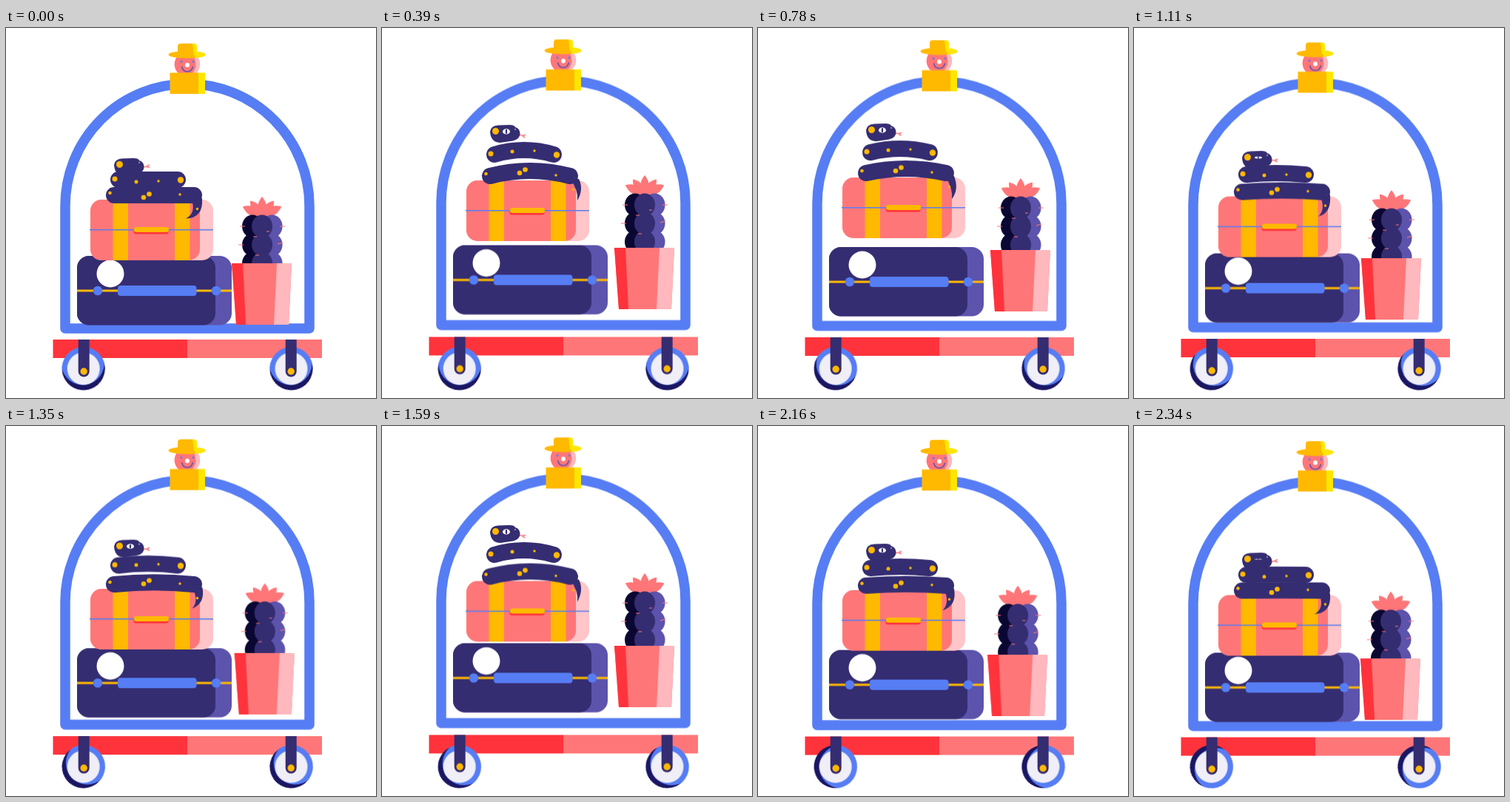
Write an HTML page without scripts that moves like this. It is 500x500 px and loops after 2.37 s.

```html
<!DOCTYPE html>
<html lang="en">
<head>
<meta charset="utf-8">
<title>Luggage trolley</title>
<style>
html, body { margin: 0; width: 100%; height: 100%; overflow: hidden; background: #fff; }
svg { display: block; width: 100vw; height: 100vh; }

/* Heights of each part: up, over and near landing, for two bounces */
.hop { animation: hop 2.37s infinite; }
.deck  { --a: -3.5px; --b: -3px; --c: -1px; --d: -3.5px; --e: -2.5px; --f: -.4px; }
.frame { --a: -4.5px; --b: -3.5px; --c: -1.5px; --d: -4.5px; --e: -3px; --f: -.5px; }
.porter { --a: -5.5px; --b: -4.5px; --c: -1.5px; --d: -5.5px; --e: -4px; --f: -.5px; }
.trunk { --a: -14.5px; --b: -12px; --c: -3.5px; --d: -14.5px; --e: -9px; --f: -1.7px; }
.bag   { --a: -26px; --b: -30px; --c: -4.5px; --d: -22.5px; --e: -17px; --f: -3.7px; }
.coil  { --a: -34px; --b: -37px; --c: -7px; --d: -31px; --e: -22px; --f: -4px; }
.head  { --a: -45px; --b: -47px; --c: -10px; --d: -42px; --e: -29px; --f: -5px; }
.spots { --a: -7px; --b: -6px; --c: -2px; --d: -7px; --e: -4px; --f: -.5px; }
.pot   { --a: -21px; --b: -18px; --c: -7px; --d: -21px; --e: -14px; --f: -4px; }
.plant { --a: -8px; --b: -7px; --c: -2px; --d: -8px; --e: -6px; --f: -.5px; }

@keyframes hop {
  0%, 50% { transform: none; animation-timing-function: cubic-bezier(.3, .42, .65, .88); }
  16.456% { transform: translateY(var(--a)); animation-timing-function: ease-out; }
  24% { transform: translateY(calc((var(--a) + var(--b)) * .58)); animation-timing-function: ease-in; }
  32.911% { transform: translateY(var(--b)); animation-timing-function: cubic-bezier(.4, .3, .7, .7); }
  46.835% { transform: translateY(var(--c)); animation-timing-function: linear; }
  67.089% { transform: translateY(var(--d)); animation-timing-function: ease-out; }
  72% { transform: translateY(calc((var(--d) + var(--e)) * .62)); animation-timing-function: ease-in; }
  82.278% { transform: translateY(var(--e)); animation-timing-function: cubic-bezier(.4, .3, .7, .7); }
  98.734% { transform: translateY(var(--f)); animation-timing-function: linear; }
  100% { transform: none; }
}

.sway { animation: sway 2.37s linear infinite; }
@keyframes sway {
  0%, 50%, 100% { transform: none; }
  16.456%, 32.911%, 67.089% { transform: translateX(9px); }
  46.835% { transform: translateX(2px); }
  82.278% { transform: translateX(10px); }
  98.734% { transform: translateX(1px); }
}

.roll { animation: roll 2.37s linear infinite; }
@keyframes roll {
  0% { transform: rotate(75deg); }
  16.456% { transform: rotate(155deg); }
  32.911% { transform: rotate(325deg); }
  46.835% { transform: rotate(390deg); }
  67.089% { transform: rotate(520deg); }
  82.278% { transform: rotate(622deg); }
  98.734% { transform: rotate(779deg); }
  100% { transform: rotate(795deg); }
}

.eye { transform-origin: 168px 185px; animation: blink 2.37s linear infinite; }
@keyframes blink {
  0%, 50%, 100% { transform: scaleY(0); }
  8%, 40%, 58%, 90% { transform: none; }
  46.835% { transform: scaleY(.35); }
  98.734% { transform: scaleY(.15); }
}

.tongue { transform-origin: 182px 188px; animation: flick 2.37s linear infinite; }
@keyframes flick {
  0%, 50%, 100% { transform: rotate(-8deg); }
  16.456%, 67.089% { transform: rotate(14deg); }
  32.911% { transform: rotate(9deg); }
  46.835%, 82.278% { transform: rotate(2deg); }
}

.navy { fill: #352d71; }
.violet { fill: #5c53ac; }
.blue { fill: #567df4; }
.gold { fill: #ffb900; }
.lemon { fill: #ffe600; }
.coral { fill: #ff7678; }
.red { fill: #ff333b; }
.pink { fill: #ffb8bd; }
.ink { fill: #0b0733; }
.line { fill: none; }
</style>
</head>
<body>
<svg viewBox="0 0 500 500">
  <defs>
    <clipPath id="tyre"><circle r="29.3"/></clipPath>
    <clipPath id="face"><circle cx="245" cy="49" r="17.3"/></clipPath>
    <g id="wheel">
      <g class="roll" clip-path="url(#tyre)">
        <circle r="29.3" fill="#1b1663"/>
        <circle class="blue" cx="-7.5" r="29.3"/>
      </g>
      <circle r="22" fill="#f0eef6"/>
    </g>
    <g id="stem">
      <path class="navy" d="M-7 421H8V464A7.5 7.5 0 0 1-7 464Z"/>
      <circle class="gold" cx=".5" cy="464" r="4.7"/>
    </g>
    <g id="lobes">
      <ellipse cy="268" rx="14" ry="15.5"/>
      <ellipse cy="293" rx="14" ry="15.5"/>
      <ellipse cy="318" rx="14" ry="15.5"/>
    </g>
    <path id="petal" d="M0 0Q-11-13 0-26Q11-13 0 0Z"/>
  </defs>

  <g class="hop deck">
    <path class="red" d="M63.500 421H245V446H63.500Z"/>
    <path class="coral" d="M245 421H427V446H245Z"/>
  </g>
  <use href="#wheel" x="104.700" y="460.300"/>
  <use href="#wheel" x="385.500" y="460.300"/>
  <g class="hop deck">
    <use href="#stem" x="104.700"/>
    <use href="#stem" x="384.700"/>
  </g>

  <g class="hop frame">
    <path class="line" d="M80 406V240.500A165 165 0 0 1 410 240.500V406Z" stroke="#567df4" stroke-width="13.500" stroke-linejoin="round"/>
  </g>
  <g class="hop porter">
    <g clip-path="url(#face)">
      <circle class="pink" cx="245" cy="49" r="18"/>
      <circle class="coral" cx="238" cy="49" r="18.500"/>
    </g>
    <g class="blue"><circle cx="237" cy="45.500" r="1.500"/><circle cx="253" cy="45.500" r="1.500"/></g>
    <path class="line" d="M237.500 52Q239 59 245 59T252.500 52" stroke="#5c53ac" stroke-width="1.500"/>
    <circle cx="245" cy="50" r="3" fill="#fff"/>
    <ellipse class="gold" cx="244.500" cy="36" rx="25" ry="5"/>
    <path class="lemon" d="M256 31.500Q269.500 33 269.500 36T256 40.500Z"/>
    <path class="gold" d="M232 36V25Q232 21 236 21H253V36Z"/>
    <path class="lemon" d="M252 21H254Q258 21 258 25V37H254Z"/>
  </g>
  <g class="hop frame">
    <path class="gold" d="M221.500 60.500H261V89H221.500Z"/>
    <path class="lemon" d="M260 60.500H269V89H260Z"/>
  </g>

  <g class="sway"><g class="hop pot">
    <g class="hop plant">
      <g class="coral" transform="translate(346 254)">
        <use href="#petal" transform="rotate(-64) scale(1.120)"/>
        <use href="#petal" transform="rotate(64) scale(1.120)"/>
        <use href="#petal" transform="rotate(-38)"/>
        <use href="#petal" transform="rotate(38)"/>
        <use href="#petal"/>
      </g>
      <use href="#lobes" x="333" class="ink"/>
      <use href="#lobes" x="359.500" class="violet"/>
      <use href="#lobes" x="346" class="navy"/>
      <path class="line" stroke="#ff7678" stroke-width="1.200" d="M316 268H323M370 268H377M314 293H321M367 292L374 290M334 282H339M337 307H342M352 275H356"/>
    </g>
    <path class="coral" d="M305 318H386L382 401H311Z"/>
    <path class="red" d="M305 318H320L324 401H311Z"/>
    <path class="pink" d="M366 318H386L382 401H362Z"/>
  </g></g>

  <g class="hop trunk">
    <rect class="violet" x="96" y="308" width="209" height="93.500" rx="16"/>
    <rect class="navy" x="96" y="308" width="187" height="93.500" rx="16"/>
    <path class="gold" d="M96 353.500H305V356.500H96Z"/>
    <g class="blue">
      <circle cx="124" cy="355" r="6.300"/>
      <circle cx="284" cy="355" r="6.300"/>
      <rect x="151" y="348" width="106.500" height="14" rx="4"/>
    </g>
    <circle cx="141" cy="332" r="18.500" fill="#fff"/>
  </g>

  <g class="hop bag">
    <rect x="114" y="232" width="166" height="82" rx="15" fill="#ffc5c8"/>
    <rect class="coral" x="114" y="232" width="148" height="82" rx="15"/>
    <path class="gold" d="M144.500 232H165V314H144.500ZM228 232H248.500V314H228Z"/>
    <path class="blue" d="M113 272H280V273.500H113Z"/>
    <rect class="red" x="172.500" y="271" width="47" height="7.500" rx="3"/>
    <rect class="gold" x="173" y="269" width="47" height="7" rx="3"/>

    <path class="navy" d="M250 230H265Q267 257 243 257.500Q258 250 250 230Z">
      <animate attributeName="d" dur="2.37s" repeatCount="indefinite"
        keyTimes="0;.16456;.32911;.46835;.5;.67089;.82278;1"
        values="M250 230H265Q267 257 243 257.500Q258 250 250 230Z;
                M254 230H266Q273 244 264 259Q266 246 254 230Z;
                M253 230H265Q272 248 262 261Q264 248 253 230Z;
                M251 230H265Q267 255 249 259Q260 250 251 230Z;
                M250 230H265Q267 257 243 257.500Q258 250 250 230Z;
                M254 230H266Q273 244 264 260Q266 246 254 230Z;
                M252 230H265Q271 250 256 261Q262 248 252 230Z;
                M250 230H265Q267 257 243 257.500Q258 250 250 230Z"/>
    </path>
    <circle class="gold" cx="258.500" cy="244.500" r="1.700"/>
    <path class="line" stroke="#352d71" stroke-width="22" stroke-linecap="round" d="M146 226Q200 226 254 226">
      <animate attributeName="d" dur="2.37s" repeatCount="indefinite"
        keyTimes="0;.16456;.32911;.46835;.5;.67089;.82278;1"
        values="M146 226Q200 226 254 226;M146 226Q200 212 254 226;M146 226Q200 214 254 226;M146 226Q200 222 254 226;
                M146 226Q200 226 254 226;M146 226Q200 212 254 226;M146 226Q200 218 254 226;M146 226Q200 226 254 226"/>
    </path>
    <g class="gold">
      <circle cx="140.500" cy="223" r="2.300"/>
      <g class="hop spots">
        <circle cx="186" cy="229" r="3.300"/>
        <circle cx="193.500" cy="224.500" r="3.300"/>
      </g>
      <circle cx="235" cy="225" r="1.700"/>
    </g>
  </g>

  <g class="hop coil">
    <path class="line" stroke="#352d71" stroke-width="22" stroke-linecap="round" d="M152 205Q192 205 232 205">
      <animate attributeName="d" dur="2.37s" repeatCount="indefinite"
        keyTimes="0;.16456;.32911;.46835;.5;.67089;.82278;1"
        values="M152 205Q192 205 232 205;M152 205Q192 193 232 205;M152 205Q192 195 232 205;M152 205Q192 201 232 205;
                M152 205Q192 205 232 205;M152 205Q192 193 232 205;M152 205Q192 197 232 205;M152 205Q192 205 232 205"/>
    </path>
    <g class="gold">
      <circle cx="147" cy="204" r="3.500"/>
      <circle cx="236" cy="205.500" r="4.200"/>
      <g class="hop spots">
        <circle cx="176" cy="208" r="2.500"/>
        <circle cx="206" cy="207" r="1.700"/>
      </g>
    </g>
  </g>

  <g class="hop head">
    <path class="line tongue" stroke="#ff7678" stroke-width="1.400" d="M182 188.500H190L194 186.500M190 188.500L194 190.500"/>
    <path class="navy" d="M157 176.500L172 176Q179 176 180 179Q186.500 181 186.500 188T177 197.500L160 200Q147 200 146 185Q147 177 157 176.500Z"/>
    <circle class="gold" cx="153.500" cy="184.500" r="4.500"/>
    <g class="eye">
      <ellipse cx="168" cy="185" rx="5" ry="3.700" fill="#fff"/>
      <ellipse class="navy" cx="168" cy="185" rx="1.200" ry="3.200"/>
    </g>
    <circle cx="180" cy="182" r=".8" fill="#fff"/>
  </g>
</svg>
</body>
</html>
```
